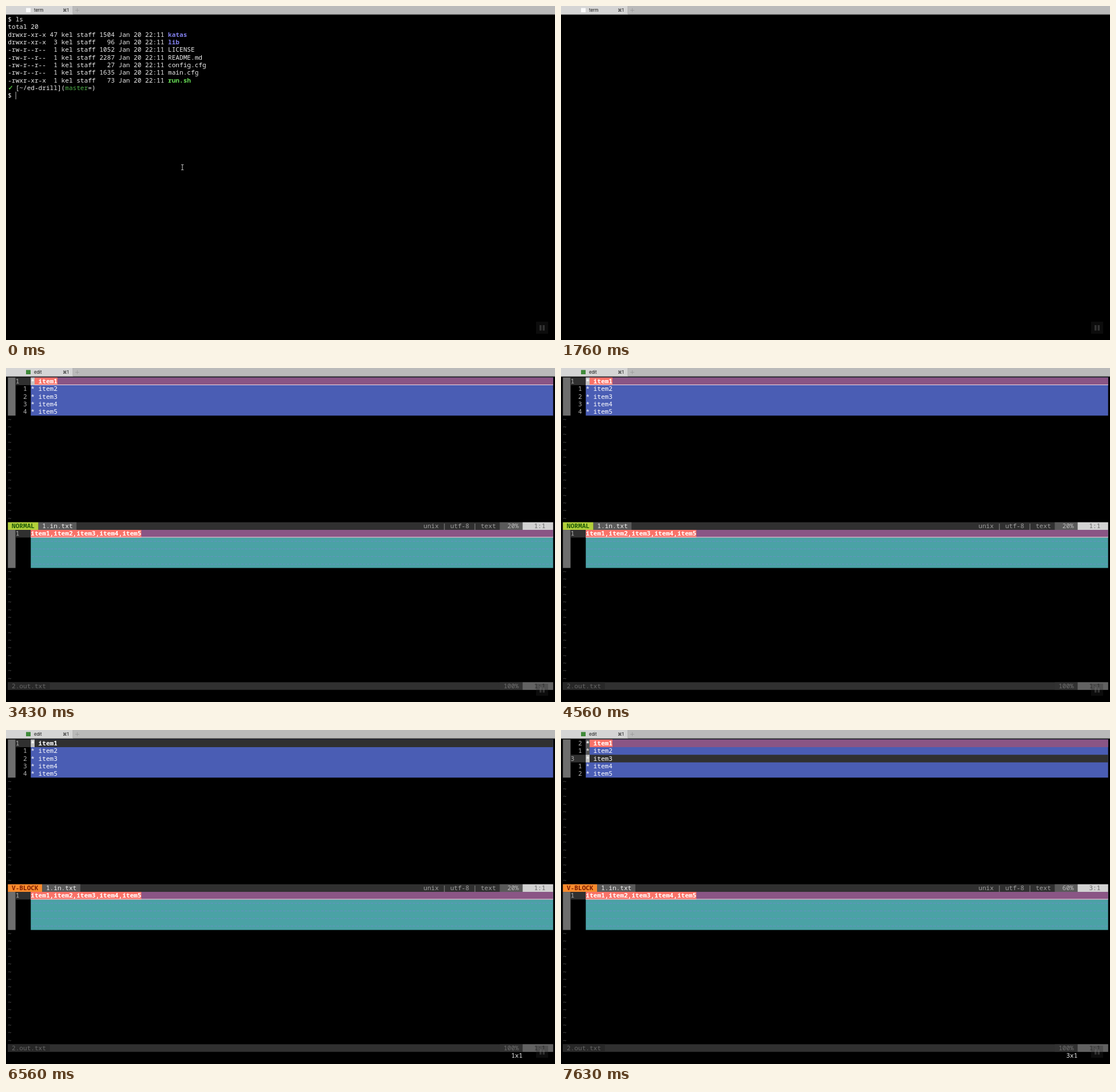
An HTML page with a canvas for the animation above (8 s loop, 959 by 584 pixels).

```html
<!DOCTYPE html>
<html lang="en">
<head>
<meta charset="utf-8">
<title>Terminal session</title>
<style>
  html, body { margin: 0; width: 100%; height: 100%; overflow: hidden; background: #000; }
  canvas { display: block; }
</style>
</head>
<body>
<canvas id="stage" width="959" height="584"></canvas>
<script>
const ctx = document.getElementById('stage').getContext('2d');
const LOOP = 8000, LEFT = 3.33, TOP = 16.65, CW = 6.66, CH = 13.32, COLS = 143;
const WHITE = '#ececec', DARK = '#303030', GRAY = '#5a5a5a', PURPLE = '#8a5585',
      SALMON = '#fa7268', BLUE = '#4a5db4', TEAL = '#4aa2a5';

const colX = c => LEFT + c * CW;
const rowY = r => TOP + r * CH;

function rect(x, y, w, h, color) {
  ctx.fillStyle = color;
  ctx.fillRect(x, y, w, h);
}

// Fills terminal cells from column c0 up to c1.
function cells(row, c0, c1, color, rows = 1) {
  rect(colX(c0), rowY(row), (c1 - c0) * CW, rows * CH, color);
}

function put(row, col, text, color = WHITE, bold = false) {
  ctx.font = `${bold ? 'bold ' : ''}11.1px "Noto Sans Mono", monospace`;
  ctx.fillStyle = color;
  [...text].forEach((ch, i) => {
    if (ch !== ' ') ctx.fillText(ch, colX(col + i), rowY(row) + 10.4);
  });
}

function tabBar(title, iconColor) {
  rect(0, 0, 959, 14.65, '#bababa');
  rect(0, 0, 117, 14.65, '#d5d5d5');
  rect(116.5, 0, 0.67, 14.65, '#a4a4a4');
  rect(0, 14.65, 959, 0.67, '#929292');
  rect(35, 3.5, 8, 7.5, iconColor);
  ctx.font = '7.6px Inter, sans-serif';
  ctx.fillStyle = '#111';
  ctx.fillText(title, 49, 10);
  ctx.fillText('⌘1', 99, 10);
  rect(121, 7, 7, 0.8, '#999');
  rect(124.1, 3.8, 0.8, 7, '#999');
}

function pauseButton() {
  rect(926, 552, 21, 21, 'rgba(40,40,40,.3)');
  for (const x of [932, 937.5]) rect(x, 558, 3.5, 9.5, 'rgba(125,125,125,.35)');
}

const listing = [
  ['drwxr-xr-x 47', 1504, 'katas', '#8281ee'],
  ['drwxr-xr-x  3', 96, 'lib', '#8281ee'],
  ['-rw-r--r--  1', 1052, 'LICENSE'],
  ['-rw-r--r--  1', 2287, 'README.md'],
  ['-rw-r--r--  1', 27, 'config.cfg'],
  ['-rw-r--r--  1', 1635, 'main.cfg'],
  ['-rwxr-xr-x  1', 73, 'run.sh', '#67dc55']
];

const typing = [[0, ''], [30, '.'], [300, './'], [630, './r'], [900, './ru'], [1300, './run.sh ']];

function shell(t) {
  put(0, 0, '$ ls');
  put(1, 0, 'total 20');
  listing.forEach(([mode, size, name, color], i) => {
    put(i + 2, 0, `${mode} kel staff ${String(size).padStart(4)} Jan 20 22:11`);
    put(i + 2, 42, name, color, !!color);
  });
  put(9, 0, '✓', '#58c845', true);
  put(9, 2, '[~/ed-drill](');
  put(9, 15, 'master', '#4fb04a');
  put(9, 21, '=)');
  const command = typing.filter(([start]) => t >= start).pop()[1];
  put(10, 0, '$ ' + command);
  const entered = t >= 1600;
  rect(colX(entered ? 0 : 2 + command.length), rowY(entered ? 11 : 10), 1, CH, '#b5b5b5');
  if (t < 30) {
    rect(307.6, 278, 1, 8, '#ccc');
    for (const y of [277, 286]) rect(306, y, 4.4, 0.9, '#ccc');
  }
}

function statusRight(row, percent, position, [bg, fg, posBg, posFg]) {
  cells(row, 129, 135, bg);
  put(row, 130, percent.padStart(4), fg);
  cells(row, 135, COLS, posBg);
  put(row, 138, position, posFg);
}

function underline(row) {
  rect(colX(6), rowY(row + 1) - 1, (COLS - 6) * CW, 1, '#f3dde2');
}

function inputPane(cursor, visual) {
  cells(0, 0, 2, '#6e6e6e', 5);
  cells(0, 6, COLS, BLUE, 5);
  for (let i = 0; i < 5; i++) {
    const current = i === cursor, first = i === 0;
    const plain = current && visual;
    if (plain) {
      cells(i, 6, COLS, DARK);
    } else if (first) {
      cells(i, 6, COLS, PURPLE);
      cells(i, 7, 13, SALMON);
    }
    if (current) {
      cells(i, 2, 6, DARK);
      if (!visual) underline(i);
      cells(i, 6, 7, '#c6c6c6');
    } else if (visual && i < cursor) {
      cells(i, 6, 7, '#555');
    }
    put(i, current ? 2 : 4, String(current ? i + 1 : Math.abs(i - cursor)), '#b4b4b4');
    put(i, 6, `* item${i + 1}`, '#fff', first);
  }
}

function fillerDashes(row) {
  const y = rowY(row) + CH / 2;
  ctx.strokeStyle = '#6c8fca';
  ctx.lineWidth = 0.9;
  ctx.setLineDash([4.8, CW - 4.8]);
  ctx.beginPath();
  ctx.moveTo(colX(6) + 0.9, y);
  ctx.lineTo(colX(COLS), y);
  ctx.stroke();
}

function outputPane() {
  cells(20, 0, 2, '#6e6e6e', 5);
  cells(20, 2, 6, DARK);
  put(20, 2, '1', '#b4b4b4');
  cells(20, 6, COLS, TEAL, 5);
  cells(20, 6, COLS, PURPLE);
  cells(20, 6, 35, SALMON);
  underline(20);
  put(20, 6, 'item1,item2,item3,item4,item5', '#fff', true);
  for (let r = 21; r < 25; r++) fillerDashes(r);
}

function editor(t) {
  const visual = t >= 5360;
  const cursor = t >= 7230 ? 2 : t >= 6760 ? 1 : 0;
  inputPane(cursor, visual);
  for (let r = 5; r < 40; r++) if (r < 19 || r > 24) put(r, 0, '~', '#555');

  const mode = visual ? ' V-BLOCK ' : ' NORMAL ';
  const n = mode.length;
  cells(19, 0, COLS, DARK);
  cells(19, 0, n, visual ? '#f98b2d' : '#b2d03a');
  put(19, 0, mode, visual ? '#7c1c00' : '#205a08', true);
  cells(19, n, n + 10, GRAY);
  put(19, n + 1, '1.in.txt', '#f2f2f2');
  put(19, 109, 'unix | utf-8 | text', '#9e9e9e');
  statusRight(19, `${20 * (cursor + 1)}%`, `${cursor + 1}:1`, [GRAY, '#bdbdbd', '#d2d2d2', '#666']);
  outputPane();

  cells(40, 0, COLS, DARK);
  cells(40, 0, 11, '#282828');
  put(40, 1, '2.out.txt', '#666');
  statusRight(40, '100%', '1:1', ['#323232', '#707070', '#626262', '#303030']);
  if (visual) put(41, 132, `${cursor + 1}x1`);
}

function draw(now) {
  const t = now % LOOP;
  rect(0, 0, 959, 584, '#000');
  if (t < 1760) shell(t);
  else if (t >= 2030) editor(t);
  if (t < 2100) tabBar('term', '#fafafa');
  else tabBar('edit', '#3f8a3a');
  pauseButton();
  requestAnimationFrame(draw);
}
requestAnimationFrame(draw);
</script>
</body>
</html>
```
